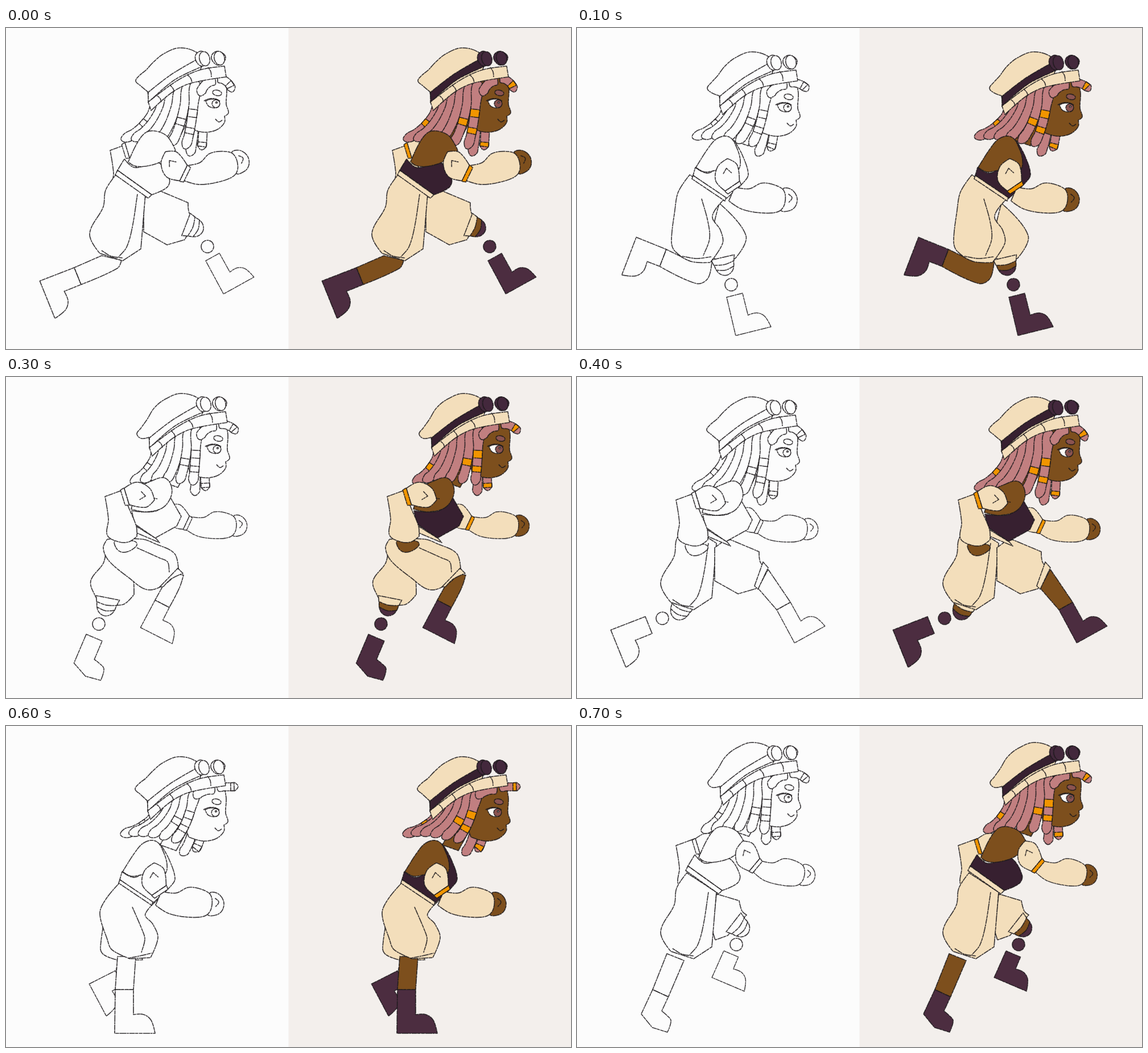
An HTML page for the animation above (800 ms loop, 993 by 564 pixels).

```html
<!DOCTYPE html>
<html lang="en">
<head>
<meta charset="utf-8">
<title>Run cycle</title>
<style>
html, body { margin: 0; width: 100%; height: 100%; overflow: hidden; background: #f3efec; }
svg { display: block; width: 100vw; height: 100vh; }
.ink { --h: #fcfcfc; --s: #fcfcfc; --d: #fcfcfc; --b: #fcfcfc; --g: #fcfcfc; --p: #fcfcfc; --o: #fcfcfc; --w: #fcfcfc; --e: #fcfcfc; }
.paint { --h: #f3debb; --s: #7d4f1d; --d: #372030; --b: #4c2d40; --g: #43283c; --p: #c17f80; --o: #f19500; --w: #fcfaf6; --e: #8b5350; }
path { stroke: #1d1a1c; stroke-linejoin: round; stroke-linecap: round; }
.base { stroke-width: 1.1; stroke-opacity: .45; }
.grain { fill: none; stroke-width: 1.7; stroke-opacity: .75; stroke-linecap: butt; stroke-dasharray: 5 .9 9 1.4 3 1 12 1.2 6 1.7; }
.pose { visibility: hidden; animation: show 800ms step-end infinite; }
@keyframes show { 0% { visibility: visible; } 12.5%, 100% { visibility: hidden; } }
</style>
</head>
<body>
<svg viewBox="0 0 993 564" preserveAspectRatio="none">
  <rect width="993" height="564" fill="#f3efec"/>
  <rect width="496.5" height="564" fill="#fcfcfc"/>
  <g class="ink" id="ink"></g>
  <g class="paint" id="paint" transform="translate(496 0)"></g>
</svg>
<script>
// A shape is a colour letter and its points; "!" marks a corner, "l" an open line,
// and a single point x,y,rx,ry,angle an ellipse.
const r1 = n => Math.round(n * 10) / 10;
const rad = deg => deg * Math.PI / 180;

function spline(pts, open) {
  const n = pts.length;
  const at = i => open ? pts[Math.max(0, Math.min(n - 1, i))] : pts[(i + n) % n];
  // Handles follow the neighbours' direction, a third of the segment long
  const handle = (i, dir) => {
    const p = at(i), a = at(i - 1), b = at(i + 1), q = at(i + dir);
    const span = Math.hypot(b.x - a.x, b.y - a.y) || 1;
    const k = p.sharp ? 0 : dir * Math.hypot(q.x - p.x, q.y - p.y) / span / 3;
    return r1(p.x + (b.x - a.x) * k) + ' ' + r1(p.y + (b.y - a.y) * k);
  };
  let d = `M${r1(pts[0].x)} ${r1(pts[0].y)}`;
  for (let i = 0; i < (open ? n - 1 : n); i++) {
    d += `C${handle(i, 1)} ${handle(i + 1, -1)} ${r1(at(i + 1).x)} ${r1(at(i + 1).y)}`;
  }
  return open ? d : d + 'Z';
}

function ellipse([x, y, rx, ry = rx, turn = 0]) {
  const dx = rx * Math.cos(rad(turn)), dy = rx * Math.sin(rad(turn));
  const arc = `A${rx} ${ry} ${turn} 1 1 `;
  return `M${r1(x - dx)} ${r1(y - dy)}${arc}${r1(x + dx)} ${r1(y + dy)}${arc}${r1(x - dx)} ${r1(y - dy)}Z`;
}

function pencil(fill, d) {
  const paint = fill === 'l' ? 'none' : `var(--${fill})`;
  return `<path class="base" style="fill:${paint}" d="${d}"/><path class="grain" d="${d}"/>`;
}

function draw(text) {
  return text.split(';').map(s => s.trim()).filter(Boolean).map(s => {
    const parts = s.slice(1).trim().split(/\s+/);
    if (parts.length === 1) return pencil(s[0], ellipse(parts[0].split(',').map(Number)));
    const pts = parts.map(p => {
      const [x, y] = p.split(',').map(parseFloat);
      return { x, y, sharp: p.endsWith('!') };
    });
    return pencil(s[0], spline(pts, s[0] === 'l'));
  }).join('');
}

const place = (art, x, y, turn = 0, size = 1) =>
  `<g transform="translate(${x} ${y}) rotate(${turn}) scale(${size})">${art}</g>`;

// Body parts, each drawn once and then placed by joint, angle and size
const part = text => { const art = draw(text); return (...spot) => place(art, ...spot); };

const cuff = part(`h20,-45! -2,-43 -19,-24 -15,0! 15,0! 28,-27; l-1,-27 9,-32! 12,-20; o-16,0! 16,0! 14,7! -14,7!`);
const arm = part(`s90,-18 104,-20 116,-8 116,8 106,18 90,18; l101,-11 108,-5 103,4;
  h6,-13! 32,-13 52,-25 76,-24 93,-15 96,8 86,22 58,27 22,24 -2,12!`);
const bentArm = part(`s192,287 215,287 230,292 222,303 205,308 194,301;
  h174,210! 207,198! 214,225 229,262 230,280! 215,290 196,289 178,278 180,250`);
const stump = part(`b-17,4! 17,4! 13,20 0,27 -13,20; s-18,3! 18,3! 16,14! 0,18 -16,14!; h-21,-5! 21,-5! 18,5! 0,8 -18,5!`);
const ball = (x, y) => draw(`b${x},${y},11`);

function boot([x, y, turn, tall = 77, size = 1, bent]) {
  const t = tall;
  const foot = bent
    ? `43,${t - 30} 55,${t - 24} 58,${t - 2}! 29,${t + 2}! 0,${t - 12}!`
    : `50,${t - 33} 63,${t - 23} 70,${t}! -1,${t}!`;
  return place(draw(`b0,0! 32,0! 32,${t - 33}! ${foot}`), x, y, turn, size);
}

// Bare shin between the trouser hem and the top edge of its boot
function shin(hem, spot) {
  const [x, y, turn, , size = 1] = spot;
  const x2 = x + 32 * size * Math.cos(rad(turn)), y2 = y + 32 * size * Math.sin(rad(turn));
  return boot(spot) + draw(`s${x},${y}! ${hem} ${x2},${y2}!`);
}

// Hair: six hanging locks, two behind the jaw and two on the forehead
const bandsOf = { 0: [.45], 4: [.5], 5: [.36, .64] };
const mainLocks = Array.from({ length: 6 }, (_, j) => ({
  x: 266 + 13.4 * j, y: 134 - 12.4 * j + j * j, w: 16, turn: 134 - 7 * j, size: 84 + 5.5 * j, bands: bandsOf[j]
}));
const jawLocks = [
  { x: 332, y: 150, w: 16, turn: 97, size: 70 },
  { x: 347, y: 155, w: 15, turn: 93, size: 54, bands: [.86] }
];
const bangs = [
  { x: 366, y: 91, w: 16, turn: 136, size: 33, bang: 1.5 },
  { x: 374, y: 88, w: 14, turn: 41, size: 30, bang: -3, bands: [.72] }
];

function lock(root, swing, stretch) {
  const turn = root.turn + (root.bang ? root.bang * Math.abs(swing) : swing);
  const size = root.size * (root.bang ? 1 : stretch);
  const dx = size * Math.cos(rad(turn)), dy = size * Math.sin(rad(turn));
  const [kx, ky] = root.bang ? [.8, .25] : [.36, .76];
  const spot = (t, side) => {
    const u = 2 * t * (1 - t), v = t * t;
    const tx = dx * (2 * (1 - 2 * t) * kx + 2 * t), ty = dy * (2 * (1 - 2 * t) * ky + 2 * t);
    const k = root.w / 2 / (Math.hypot(tx, ty) || 1);
    return { x: root.x + dx * (u * kx + v) - ty * k * side, y: root.y + dy * (u * ky + v) + tx * k * side, tx: tx * k, ty: ty * k };
  };
  const steps = [0, .25, .5, .75, .95], end = spot(1, 0);
  const cap = { x: end.x + end.tx * .7, y: end.y + end.ty * .7 };
  let art = pencil('p', spline([...steps.map(t => spot(t, 1)), cap, ...steps.map(t => spot(t, -1)).reverse()]));
  const half = (root.bang ? 4 : 6) / size;
  for (const t of root.bands || []) {
    const band = [spot(t - half, 1), spot(t + half, 1), spot(t + half, -1), spot(t - half, -1)];
    art += pencil('o', spline(band.map(p => ({ ...p, sharp: true }))));
  }
  return art;
}

const face = draw(`s272,190! 285,165! 322,160! 300,200!;
  s340,90! 384,86! 388,108 387,134 391,149 384,155! 384,166 372,178 355,183 340,182 322,176! 316,158!;
  e371,114,8,4.5,12; w351,128! 361,125 374,128 372,139 357,138; e369,133,6.8; w370,131,1.4;
  l348,128 355,125 366,124 376,128; l368,160 374,165 380,162;
  p262,140! 335,95! 318,155! 290,165! 262,152!`);
const gear = draw(`d250,113! 290,82 336,55! 344,68! 295,92 250,131!;
  h250,130! 300,93 340,74 384,67! 387,86! 325,97 292,113 255,145!;
  l266,119 271,124 273,130; l288,100 294,107 295,112; l319,82 325,89 327,96; l355,69 360,77 361,86;
  g334,46 345,41 357,55 345,67 334,58; g349,54,9,12.5,-15;
  g362,47 373,41 386,52 374,65 363,58; g375,53,9,12,-15`);

// Bounce of the head and drag of hat and hair; the same for both steps of the run
const beats = [
  { at: [0, 0], sag: -2, swing: 0, stretch: 1 },
  { at: [1, 7], sag: 4, swing: 6, stretch: .92 },
  { at: [-1, 19], sag: -3, swing: 14, stretch: .82 },
  { at: [2, -6], sag: 11, swing: -5, stretch: .84 }
];

function head({ at, sag, swing, stretch }) {
  const hair = list => list.map(root => lock(root, swing, stretch)).join('');
  const crown = `h249,112! 236,${103 + sag} 228,${95 + sag} 235,${85 + sag} 246,${75 + sag / 2} 258,61 276,46 304,35 335,43 345,62! 340,80! 252,130!`;
  return place(hair(jawLocks) + face + hair(mainLocks) + hair(bangs) + draw(crown) + gear, ...at);
}

// Chest below the head, shoulder above it
const uppers = {
  drive: {
    chest: `d208,230! 225,245 250,240 268,236 287,265 283,280 256,293! 196,250!; h196,250! 256,293! 250,299! 192,258!`,
    shoulder: `s215,235! 230,203 245,184 262,181 283,190 298,215! 272,235 245,243 225,242`
  },
  tuck: {
    chest: `d208,245! 230,255 250,240 275,196! 290,222 301,257 292,272 262,300! 204,259!; h204,259! 262,298! 260,304! 202,265!`,
    shoulder: `s209,245! 230,212 245,195 263,190 276,200 287,240 270,260 250,250 225,253`
  },
  fold: {
    chest: `d200,268! 275,222! 285,225! 303,260 301,280 292,292 230,282 204,275!`,
    shoulder: `s222,235! 237,210 257,201 273,208 281,230 274,255 257,270 240,275! 225,262; l256,257 264,250 269,243`
  },
  reach: {
    chest: `d221,235! 265,235 288,210! 308,245! 300,262! 262,283! 226,258!; h222,258! 264,284! 270,291! 225,272!`,
    shoulder: `s220,232! 235,195 255,183 278,177 290,190 290,210 275,230 245,237; l248,216 258,213 266,214`
  }
};

const strideBack = draw(`h193,258! 245,292! 241,340 237,388! 205,409! 165,396! 147,362 171,314 175,285;
  l231,292 222,350 212,385 198,402; l168,391 185,401 205,404`);
const strideFront = draw(`h258,288! 270,286! 320,307! 322,325 333,338! 314,372! 283,381! 242,358! 242,300!`);
const passing = draw(`h200,275! 175,305 165,330 178,375 186,393 218,409! 254,407! 267,372 258,348 245,330 280,295!;
  l222,318 240,360 244,375 238,398; l215,408 235,404 256,399`);
const farHem = draw(`h175,330! 166,390 172,402 195,411! 240,411! 215,330!`);
const legBack = [120, 421, 68, 65], legUnder = [192, 430, 62, 57, .9], legFlat = [192, 463, 0];
const legFront = [351, 409, -29, 77, .86], legKick = [157, 389, 111, 57];

const poses = [
  {
    upper: 'drive', shift: [0, 0],
    back: bentArm(9, 5) + cuff(213, 215, 73, .9),
    front: arm(312, 256, -12) + cuff(312, 255, -64),
    legs: strideFront + stump(321, 347, -69) + ball(354, 384) + boot(legFront) +
      shin('168,400! 203,408! 196,422', legBack) + strideBack
  },
  {
    upper: 'tuck', shift: [0, 0], back: '',
    front: arm(270, 292, 6) + cuff(273, 278, -34),
    legs: draw('h250,308! 297,365 278,405! 245,412! 235,380') + stump(257, 408, -13) + ball(271, 451) +
      boot([263, 473, -14, 77, .9]) + shin('200,410! 237,410! 230,440 210,449', legKick) +
      draw(`h198,258! 178,288 172,320 166,375 172,392 200,410 234,412! 256,378 252,355 238,330 262,298!;
        l219,300 230,340 233,370 222,400; l185,401 210,405 236,402`)
  },
  {
    upper: 'fold', shift: [-2, 0],
    back: arm(240, 288),
    front: arm(216, 280, 31, .95) + cuff(226, 266, 20, .92),
    legs: ball(212, 447) + farHem + boot(legUnder) + boot(legFlat) +
      shin('225,412! 258,410! 259,425 240,440', legUnder) + passing
  },
  {
    upper: 'reach', shift: [0, 0],
    back: arm(318, 257, 3, .9) + cuff(317, 256, -65, .85),
    front: bentArm(0, 0) + cuff(212, 210, 73),
    legs: draw('h176,290! 172,325 149,358 157,385 167,397! 205,400 225,382! 224,355 215,300') +
      stump(178, 393, 11) + ball(163, 434) + boot([141, 452, 23, 70, .95, true]) +
      shin('288,345! 312,348! 305,370', [262, 392, 27, 62, .88]) +
      draw(`h178,285! 240,285 262,293 296,310 303,338! 285,360 250,374 215,352 180,322 171,300;
        h302,336! 311,345! 290,355 277,368! 270,369!; l230,300 270,318 284,325 287,343`)
  },
  {
    upper: 'reach', shift: [0, 6],
    back: arm(318, 263, 3, .9) + cuff(317, 262, -65, .85),
    front: bentArm(0, 6) + cuff(212, 216, 73),
    legs: boot(legBack) + ball(150, 424) + stump(185, 401, 25) + strideBack +
      shin('318,371! 336,338!', legFront) + strideFront + draw('h327,325! 336,335! 318,373! 312,367!')
  },
  {
    upper: 'fold', shift: [2, -11],
    back: arm(240, 289, 0, 1.07),
    front: arm(222, 264, 46, 1.07) + cuff(227, 250, 20, .92),
    legs: draw('h172,320! 163,372 178,395 198,405! 230,400! 220,330!') + stump(202, 402, 12, .9) + ball(173, 415) +
      boot(legKick) + shin('244,420! 277,412!', [268, 487, -14, 64, .9]) +
      draw(`h205,245! 175,282 169,300 174,330 195,375 212,400 243,417! 276,406! 292,385 294,360 285,330 290,280!;
        h242,415! 277,405! 278,411! 245,423!; l250,342 262,365 266,378 264,405`)
  },
  {
    upper: 'tuck', shift: [-4, 11], back: '',
    front: arm(266, 303, 6) + cuff(269, 289, -34),
    legs: ball(205, 428) + boot(legUnder) + farHem + shin('196,405! 228,405!', legFlat) + passing
  },
  {
    upper: 'drive', shift: [-1, -4],
    back: bentArm(0, 0) + cuff(212, 211, 73, .9),
    front: arm(314, 247, 10, .9) + cuff(312, 244, -50, .95),
    legs: draw('h245,295! 285,307! 290,325 298,332! 265,368! 243,376! 238,360!') + stump(279, 348, -52) + ball(280, 384) +
      boot([258, 395, 23, 59, .87]) + shin('158,400! 188,412!', [133, 463, 25, 62, .95, true]) + strideBack
  }
];

const figure = poses.map((p, i) => {
  const { chest, shoulder } = uppers[p.upper];
  const art = p.back + p.legs + place(draw(chest), ...p.shift) + head(beats[i % 4]) +
    place(draw(shoulder), ...p.shift) + p.front;
  return `<g class="pose" style="animation-delay:${i * 100 - 800}ms">${art}</g>`;
}).join('');
document.getElementById('ink').innerHTML = figure;
document.getElementById('paint').innerHTML = figure;
</script>
</body>
</html>
```
